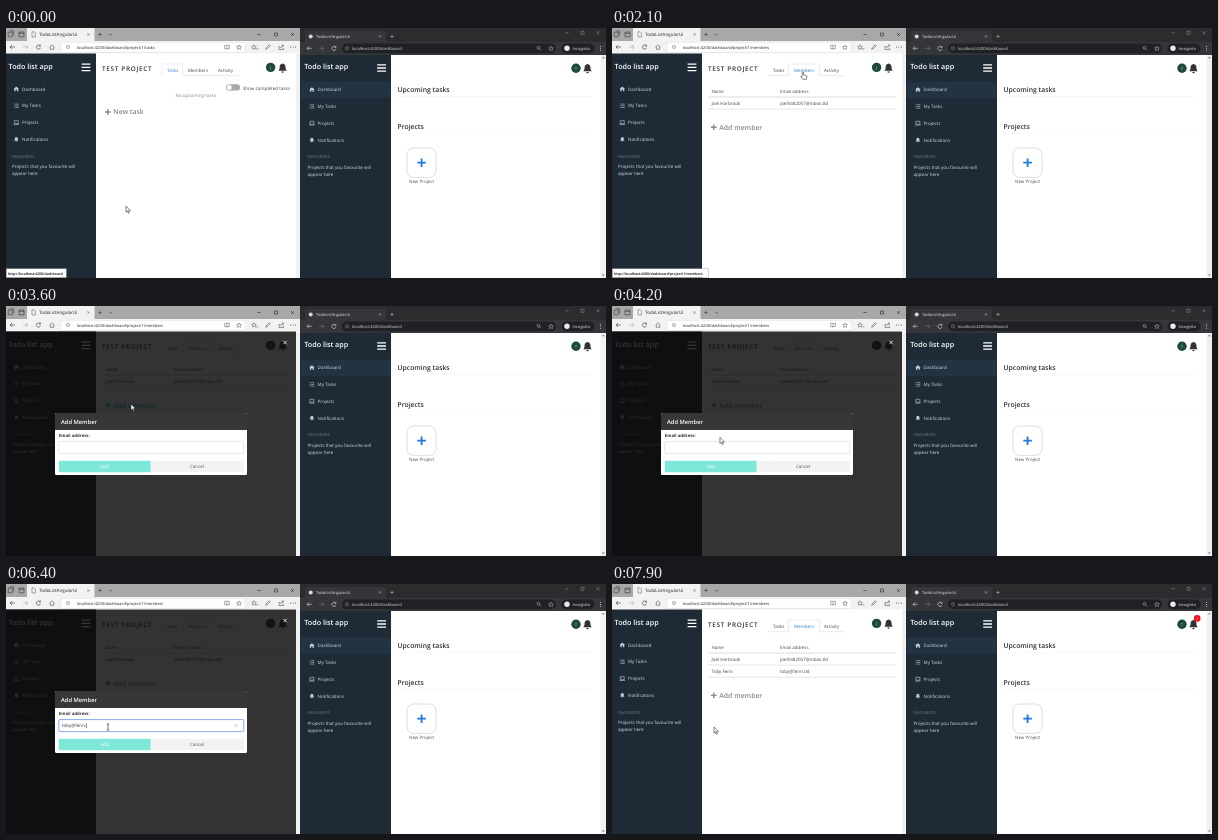
These frames come from a looping animation (600 by 250 pixels, 8 s). An HTML page:

```html
<!DOCTYPE html>
<html lang="en">
<head>
<meta charset="utf-8">
<title>Todo list app</title>
<style>
html, body { margin: 0; width: 100%; height: 100%; overflow: hidden; background: #fff; }
svg { display: block; width: 600px; height: 250px; font-family: "Open Sans", "Noto Sans", sans-serif; text-rendering: geometricPrecision; }
</style>
</head>
<body>
<svg id="stage" viewBox="0 0 600 250"></svg>
<script>
const LOOP = 8000, STEP = 100;
const EMAIL = 'toby@fenn.tld';
const HOST = 'localhost:4200/dashboard';
const BOLD = 'font-weight="600"', MID = 'text-anchor="middle"';

const text = (x, y, s, size = 4.5, fill = '#444', more = '') =>
  `<text x="${x}" y="${y}" font-size="${size}" fill="${fill}" ${more}>${s}</text>`;
const rect = (x, y, w, h, fill, more = '') =>
  `<rect x="${x}" y="${y}" width="${w}" height="${h}" fill="${fill}" ${more}/>`;
const line = (d, stroke, w = .6, more = '') =>
  `<path d="${d}" fill="none" stroke="${stroke}" stroke-width="${w}" ${more}/>`;
const shape = (d, fill, more = '') => `<path d="${d}" fill="${fill}" ${more}/>`;
const dot = (x, y, r, fill, more = '') => `<circle cx="${x}" cy="${y}" r="${r}" fill="${fill}" ${more}/>`;
const group = (id, body, more = '') => `<g id="${id}" ${more}>${body}</g>`;
const at = (x, y, body, k = 1) => `<g transform="translate(${x} ${y}) scale(${k})">${body}</g>`;

const cross = (x, y, r, c, w) => line(`M${x - r} ${y - r}l${2 * r} ${2 * r}m0 ${-2 * r}l${-2 * r} ${2 * r}`, c, w);
const plus = (x, y, r, c, w) => line(`M${x - r} ${y}h${2 * r}M${x} ${y - r}v${2 * r}`, c, w);
const arrow = (x, y, c, dir) => line(`M${x - 2.4} ${y}h4.8M${x + dir * .4} ${y - 2}l${dir * 2} 2l${-dir * 2} 2`, c, .6);
const reload = (x, y, c) => line(`M${x + 1.6} ${y - 1.3}a2.1 2.1 0 1 0 .4 2M${x + 1.9} ${y - 2.4}v1.5h-1.5`, c, .6);
const info = (x, y, c) => dot(x, y, 1.7, 'none', `stroke="${c}" stroke-width=".4"`) + line(`M${x} ${y - .3}v1.2M${x} ${y - 1}v.4`, c, .4);
const star = (x, y, c) => line(`M${x} ${y - 2.3}l.7 1.6 1.7.1-1.3 1.1.4 1.7-1.5-.9-1.5.9.4-1.7-1.3-1.1 1.7-.1z`, c, .45);
const controls = (xs, y, c) => line(`M${xs[0] - 1.6} ${y}h3.2M${xs[1] - 1.5} ${y - 1.5}h3v3h-3z`, c, .5) + cross(xs[2], y, 1.5, c, .5);
const bell = (x, y, k, c) => at(x, y, shape('M0-4.8c-2.2.3-3.1 1.7-3.1 3.7 0 2-.4 2.9-1.4 4h9c-1-1.1-1.4-2-1.4-4 0-2-.9-3.4-3.1-3.7zM-1.3 3.6a1.3 1.3 0 0 0 2.6 0z', c), k);
const avatar = (x, y, s) => dot(x, y, 4.7, '#1c4a3c') + text(x, y + 1.3, s, 3.6, '#fff', MID);

const sidebar = (x, dx, dy, top, active) => {
  const c = '#c3cad1';
  const icons = [
    shape('M0-2.4L-2.8 0h.8v2.2h1.4V.6h1.2v1.6H2V0h.8z', c),
    line('M-2.4-1.7h.8M-1-1.7h3.4M-2.4 0h.8M-1 0h3.4M-2.4 1.7h.8M-1 1.7h3.4', c, .6),
    line('M-2-1.9h4v2.9h-4zM-2.8 1.9h5.6', c, .6),
    bell(0, 0, .48, c)
  ];
  const items = ['Dashboard', 'My Tasks', 'Projects', 'Notifications'].map((name, i) => {
    const y = 61 + i * 16.8;
    return at(10.3, y, icons[i]) + text(16, y + 1.6, name, 4.5, '#d5dae0');
  }).join('');
  return rect(x, top, 90, 250 - top, '#1e2b37') +
    (active ? rect(x, 53.5, 90, 16.5, '#223342') : '') + at(dx, dy,
    text(2.6, 40.8, 'Todo list app', 7.2, '#fff', BOLD) +
    line('M75.6 36.2h8.8m-8.8 3.2h8.8m-8.8 3.2h8.8', '#fff', 1.3) + items +
    text(6, 129.6, 'FAVOURITES', 3.9, '#76828e') +
    text(6, 140, 'Projects that you favourite will', 4.5, '#d5dae0') +
    text(6, 147, 'appear here', 4.5, '#d5dae0'));
};

const leftChrome =
  rect(0, 0, 295, 13, '#a8a8a8') +
  line('M2.2 4.2h4v4.6h-4zM3.6 2.8h4v4.6M13 4h5v4.8h-5zM13 5.4h5', '#222', .5) +
  rect(21, 0, 67.5, 13, '#f2f2f2') +
  line('M26 3.8h2.2l1.2 1.2v4H26z', '#555', .5) +
  text(33, 8, 'TodoListAngularUi', 4.5, '#222') + cross(82.5, 6.5, 1.2, '#444', .45) +
  plus(94, 6.5, 1.7, '#222', .5) + line('M103 5.8l1.5 1.5 1.5-1.5', '#222', .5) +
  controls([253, 270, 286.5], 6.5, '#111') +
  rect(0, 13, 295, 12.5, '#f2f2f2') + rect(55, 14.3, 184, 9.8, '#fff', 'stroke="#ccc" stroke-width=".3"') +
  arrow(6.5, 19, '#333', -1) + arrow(19.5, 19, '#aaa', 1) + reload(32.5, 19, '#333') +
  at(46, 19, line('M-2.4 0L0-2.2 2.4 0M-1.7-.4v2.7h3.4V-.4', '#333', .5)) + info(62, 19, '#555') +
  at(221, 19, line('M-2.3-1.7q1.4-.6 2.3.3 1-.9 2.4-.3v3.4q-1.4-.5-2.4.4-.9-.9-2.3-.4zM0-1.4v3.5', '#444', .45)) +
  star(233, 19.2, '#444') + star(248, 19, '#444') + line('M250 20.8h2.4', '#444', .5) +
  at(262, 19, line('M-2.3 2.2l.5-1.5 3-3 1 1-3 3z', '#333', .5)) +
  at(275.5, 19, line('M-1.5-.5h-1v3H2V.9M-.9 1q.2-2.4 3-2.4M.8-2.7l1.4 1.3L.8-.1', '#333', .5)) +
  [284.5, 287, 289.5].map(x => dot(x, 19, .5, '#333')).join('');

const rightChrome =
  rect(294, 0, 306, 14, '#2b2c2e') + shape('M297 14q2 0 2-2V5q0-2 2-2h77q2 0 2 2v7q0 2 2 2z', '#35363a') +
  dot(304.7, 8.4, 2, '#d6d6d6') + text(310, 10, 'TodoListAngularUi', 4, '#e4e5e7') +
  cross(374, 8.4, 1.1, '#ccc', .45) + plus(386, 8.4, 1.7, '#ccc', .5) +
  controls([561, 576.5, 592], 4.8, '#999') +
  rect(294, 14, 306, 13, '#35363a') + rect(336, 15.6, 214, 9.6, '#202124', 'rx="4.8"') +
  arrow(303.5, 20.3, '#ddd', -1) + arrow(315.5, 20.3, '#777', 1) + reload(328, 20.3, '#ddd') +
  info(341, 20.3, '#aaa') + text(346, 21.9, HOST, 4.1, '#d8dadd') +
  dot(532.5, 19.8, 1.4, 'none', 'stroke="#ccc" stroke-width=".5"') + line('M533.5 20.8l1.5 1.5', '#ccc', .5) +
  star(545, 20.4, '#ccc') + rect(555.5, 15.6, 33, 9.6, '#202124', 'rx="4.8"') +
  dot(561, 20.3, 2.7, '#e8eaed') + text(566.5, 21.8, 'Incognito', 4, '#e8eaed') +
  [18.4, 20.3, 22.2].map(y => dot(594.5, y, .5, '#ddd')).join('');

const rightPage =
  rect(294, 27, 1, 223, '#1e2b37') + rect(385, 27, 209.5, 223, '#fff') + rect(594.5, 27, 5.5, 223, '#f1f1f1') +
  shape('M596 30.2l1.3-1.5 1.3 1.5zM596 246.5l1.3 1.5 1.3-1.5z', '#666') +
  sidebar(295, 295.6, .6, 27, true) +
  avatar(570, 40.2, 'T') + bell(581.5, 40.6, .95, '#333') +
  text(391.5, 63.6, 'Upcoming tasks', 6.8, '#2b2f33', BOLD) +
  text(391.5, 100.5, 'Projects', 6.8, '#2b2f33', BOLD) +
  line('M391.5 68.5h195M391.5 105h195', '#eee', .4) +
  rect(401, 120, 29, 29.4, '#fff', 'rx="6.5" stroke="#c4c8cd" stroke-width=".6"') +
  plus(415.6, 134.7, 4.3, '#1f78dd', 1.8) +
  text(415.6, 155.2, 'New Project', 4.5, '#555', MID) +
  group('badge', dot(585.2, 34.4, 3.3, '#f0141e') + text(585.2, 35.8, '1', 3.8, '#fff', MID));

const member = (y, name, mail) => text(99.5, y + 1.6, name, 4.5) + text(168, y + 1.6, mail, 4.5) +
  line(`M96 ${y + 6}h188`, '#ccc', .5);
const addLink = (id, y, label) =>
  group(id, plus(101.8, y, 2.8, 'currentColor', 1.4) + text(107.3, y + 2.4, label, 6.85, 'currentColor', BOLD), 'color="#888"');

const leftPage =
  rect(90, 25.5, 204, 224.5, '#fff') + rect(290, 25.5, 4, 224.5, '#f1f1f1') +
  sidebar(0, 0, 0, 25.5, false) +
  text(96, 43.4, 'TEST PROJECT', 6.4, '#333', BOLD + ' letter-spacing=".67"') +
  line('', '#d5d9dd', .5, 'id="tabs"') +
  text(161, 43.6, 'Tasks', 4.5, '#444', 'id="tasksTab"') +
  text(182, 43.6, 'Members', 4.5, '#444', 'id="membersTab"') + text(212, 43.6, 'Activity', 4.5) +
  avatar(264.6, 39.4, 'J') + bell(276.6, 40, .95, '#333') +
  group('tasks',
    rect(220, 56.2, 14, 6.4, '#a9a9a9', 'rx="3.2"') + dot(223.2, 59.4, 2.8, '#fff', 'stroke="#888" stroke-width=".4"') +
    text(236.8, 61.5, 'Show completed tasks', 4.55) + text(169.5, 68.9, 'No upcoming tasks', 4.55, '#888') +
    addLink('newTask', 84, 'New task')) +
  group('members',
    text(99.5, 64.6, 'Name', 4.4) + text(168, 64.6, 'Email address', 4.4) + line('M96 69h188', '#bbb', .5) +
    member(75, 'Joel Harbrook', 'joelh482057@inbox.tld') +
    group('newRow', member(87.2, 'Toby Fenn', EMAIL)) +
    group('addShift', addLink('addMember', 99.2, 'Add member'))) +
  group('status', rect(.3, 240.8, 60, 8.8, '#fff', 'id="statusBox" stroke="#999" stroke-width=".4"') +
    text(2, 246.6, '', 3.5, '#000', 'id="statusText" ' + BOLD));

const modal = group('modal',
  rect(0, 25.5, 290, 224.5, '#0a0a0a', 'opacity=".83"') + cross(279, 36.5, 1.7, '#fff', .8) +
  rect(49, 107, 192, 62, '#fff', 'rx="1.5"') +
  shape('M49 124v-15.5q0-1.5 1.5-1.5h189q1.5 0 1.5 1.5V124z', '#373737') +
  text(55, 117.6, 'Add Member', 5.75, '#fff', BOLD) +
  text(52.8, 131.2, 'Email address:', 4.3, '#333', 'font-weight="700"') +
  rect(52.8, 135.6, 185, 12, '#fff', 'id="field" rx="1" stroke-width=".6"') +
  text(56, 143.2, '', 4.5, '#333', 'id="typed"') + line('', '#111', .5, 'id="caret"') +
  group('clear', cross(230, 141.6, 1.2, '#888', .45)) +
  group('addButton', rect(52.8, 154.8, 92, 11.4, '#00d1b2', 'rx="1"') + text(98.7, 162.1, 'Add', 4.5, '#fff', MID)) +
  rect(144.8, 154.8, 93, 11.4, '#f3f3f3', 'rx="1"') + text(191, 162.1, 'Cancel', 4.5, '#555', MID));

const pointers = group('pointer',
  group('arrow', shape('M0 0v6.2l1.4-1.3 1 2.3 1-.4-1-2.2h2z', '#fff', 'stroke="#111" stroke-width=".5"')) +
  group('hand', shape('M-.8-.4q.8-.8 1.4 0v2.8l2.8.7q.7.3.5 1l-.5 2.7h-3.6l-2-2.7q.2-.9 1.4 0z', '#fff', 'stroke="#111" stroke-width=".5"')) +
  group('beam', line('M-1.2-3h2.4M0-3v6M-1.2 3h2.4', '#222', .6)));

const stage = document.getElementById('stage');
stage.innerHTML = leftChrome + text(71, 20.6, '', 4, '#222', 'id="url"') + leftPage + rightChrome + rightPage + modal + pointers;

const el = {};
stage.querySelectorAll('[id]').forEach(e => el[e.id] = e);
const set = (id, name, value) => el[id].setAttribute(name, value);
const show = (id, on) => set(id, 'display', on ? 'inline' : 'none');

// Pointer stops: time, x, y
const stops = [[0, 120, 178], [100, 120, 178], [900, 191, 44.5], [2500, 191, 44.5],
  [3300, 125, 98], [3800, 125, 98], [4400, 102, 143], [LOOP, 102, 143]];

function pointerAt(t) {
  const i = stops.findIndex(s => s[0] > t);
  const [t0, x0, y0] = stops[i - 1], [t1, x1, y1] = stops[i];
  const p = (t - t0) / (t1 - t0), k = p * p * (3 - 2 * p);
  return [x0 + (x1 - x0) * k, y0 + (y1 - y0) * k];
}

function draw(t) {
  const [x, y] = pointerAt(t);
  const onMembers = t >= 1600, open = t >= 3600 && t < 7700, added = t >= 7700;
  const overTab = x > 177 && y < 48;
  const overAdd = onMembers && x < 151 && y > 94 && y < 103;
  const overField = open && y > 135.6;
  const hand = overTab || overAdd && !open;

  set('tabs', 'd', onMembers ? 'M156 47.7H176.5V36H207.5V47.7H233' : 'M156 47.7V36H176.5V47.7H233');
  set('tasksTab', 'fill', onMembers ? '#444' : '#2a7bd8');
  set('membersTab', 'fill', onMembers || overTab ? '#2a7bd8' : '#444');
  show('tasks', !onMembers);
  show('members', onMembers);
  show('newRow', added);
  show('badge', added);
  set('addShift', 'transform', `translate(0 ${added ? 12.2 : 0})`);
  set('addMember', 'color', overAdd ? '#22c4d6' : '#888');
  el.url.textContent = `${HOST}/project/1/${onMembers ? 'members' : 'tasks'}`;

  const leaving = t < 500;
  show('status', leaving || t >= 1000 && t < 2700);
  el.statusText.textContent = `http://${HOST}${leaving ? '' : '/project/1/members'}`;
  set('statusBox', 'width', leaving ? 60 : 96.5);

  const count = Math.max(0, Math.min(EMAIL.length, Math.floor((t - 4900) / 155) + 1));
  const value = EMAIL.slice(0, count), focus = t >= 4600;
  const lastKey = count ? 4900 + (count - 1) * 155 : 4600;
  show('modal', open);
  el.typed.textContent = value;
  set('field', 'stroke', focus ? '#3273dc' : '#d5d5d5');
  show('clear', count > 0);
  set('addButton', 'opacity', /^\w+@\w+(\.\w+)?$/.test(value) ? 1 : .5);
  const end = 56.3 + (open && count ? el.typed.getComputedTextLength() : 0);
  set('caret', 'd', `M${end} 139v5.2`);
  show('caret', focus && (t - lastKey) % 1060 < 530);

  set('pointer', 'transform', `translate(${x} ${y})`);
  show('hand', hand);
  show('beam', overField);
  show('arrow', !hand && !overField);
}

function tick() {
  draw(Math.floor(performance.now() % LOOP / STEP) * STEP);
  requestAnimationFrame(tick);
}
tick();
</script>
</body>
</html>
```
